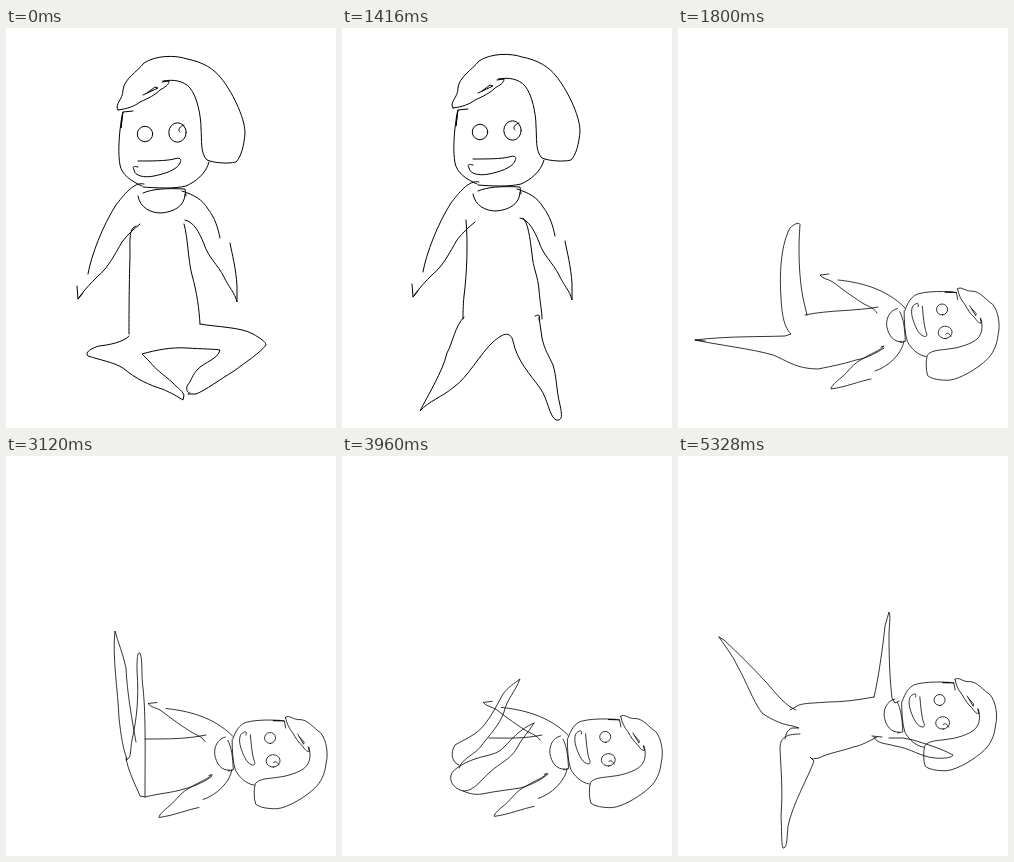
These frames come from a looping animation (330 px wide and 400 px high, 5760 ms). An HTML page without scripts:

```html
<!DOCTYPE html>
<html lang="en">
<head>
<meta charset="utf-8">
<title>Stretching doodle</title>
<style>
html, body { margin: 0; width: 100%; height: 100%; overflow: hidden; background: #fff; }
svg { display: block; width: 100%; height: 100%; overflow: hidden; }
path, circle, ellipse { vector-effect: non-scaling-stroke; }
.ink { fill: none; stroke: #000; stroke-width: 1; stroke-linecap: round; stroke-linejoin: round; }
.thin { stroke-width: .8; }
/* poses sit side by side; the strip jumps one stage width at a time */
.strip { animation: flip 5760ms step-end infinite; }
@keyframes flip {
  0% { transform: translateX(0); }
  14.5833% { transform: translateX(-330px); }
  31.25% { transform: translateX(-660px); }
  54.1667% { transform: translateX(-990px); }
  68.75% { transform: translateX(-1320px); }
  81.25%, 100% { transform: translateX(-1650px); }
}
</style>
</head>
<body>
<svg viewBox="0 0 330 400">
<defs>
  <g id="head">
    <path d="M112 82C108 76 117 72 117 62C118 51 131 44 138 35C150 27 170 27 181 31C197 34 208 41 215 50C225 62 239 89 239 105C238 118 235 129 230 134C222 136 208 135 201 132C194 125 196 112 195 100C195 88 191 68 184 60C178 53 168 51 157 53"/>
    <path d="M112 82C121 81 129 78 134 74C143 70 149 67 154 62C159 59 163 57 163 53L156 54M137 67L152 60L149 59L141 65"/>
    <path d="M127 83L117 84C115 90 115 96 114 102C113 112 112 126 114 137C116 147 125 153 136 158M117 84L115 100L116 90"/>
    <path d="M203 134C200 146 189 154 180 158C168 161 150 160 137 159"/>
    <circle cx="139" cy="106" r="7.7"/>
    <ellipse cx="171.500" cy="104.500" rx="8.700" ry="9.700"/>
    <path d="M178 97C174 98 171 102 174 104"/>
    <path d="M132 133C145 133 160 133 168 131C174 129 176 131 174 135C171 142 158 146 148 148C138 150 129 148 128 142C126 138 128 138 132 139"/>
    <path d="M137 165C146 161 160 160 179 161L180 168M132 168C134 180 145 185 155 185C168 184 179 178 179 166"/>
  </g>

  <g id="upright">
    <use href="#head"/>
    <path d="M138 156C128 153 117 168 110 177C97 197 85 228 82 246M71 258L72 271L77 265M72 271C78 262 85 255 92 248C102 240 109 226 116 214C122 206 128 201 134 196"/>
    <path d="M176 163C188 167 196 171 202 181C209 190 212 200 214 210M224 215C226 226 230 240 231 258V274C229 265 222 258 218 249C212 237 202 229 198 216C193 204 188 194 179 192"/>
  </g>

  <g id="tilted">
    <use href="#head" transform="matrix(.062 .708 -.713 .064 331 176.300)"/>
  </g>

  <g id="lying">
    <use href="#tilted"/>
    <path d="M160 252C180 254 208 260 227 280M151 246L142 247C145 251 150 251 155 254C165 262 178 271 186 276C192 279 197 281 199 285"/>
    <path d="M226 313C224 326 210 339 197 343M193 351C182 353 168 359 153 361C153 358 158 354 164 349C171 343 174 336 186 330C194 325 203 322 206 318L203 319"/>
  </g>
</defs>

<g class="strip ink">
  <!-- cross-legged -->
  <g>
    <use href="#upright"/>
    <path d="M130 198L127 200C123 205 124 215 124 228C123 260 123 290 123 306M178 196C182 210 182 232 186 247C191 265 193 280 194 296"/>
    <path d="M123 308C118 314 103 317 93 318C83 321 79 325 82 328C94 332 107 334 117 340C130 351 143 357 156 361C166 365 172 369 177 372L178 367C175 361 171 360 167 355C157 346 149 341 144 334C140 330 138 328 136 326C150 322 165 319 181 320C195 321 210 321 214 322C212 331 199 334 192 341C186 347 186 352 181 358C180 363 182 365 184 365"/>
    <path d="M194 296C210 299 235 299 247 306C254 310 260 314 260 317C255 324 240 334 228 343C213 352 200 362 190 366H182"/>
  </g>

  <!-- standing -->
  <g transform="translate(330)">
    <use href="#upright" x="-1" y="-2"/>
    <path d="M124 192C126 215 125 245 122 268C121 278 121 286 121 291M181 190C186 194 188 210 190 226C191 240 196 248 197 262C198 275 200 283 200 291M193 288C198 286 198 287 197 292"/>
    <path d="M122 289C113 298 111 314 105 325C100 345 87 365 78 383C87 373 100 369 112 359C126 349 138 326 151 314C160 306 168 302 171 313C175 333 188 346 198 360C206 371 207 388 214 392C221 393 220 387 218 377C214 361 215 350 211 337C206 326 203 323 200 310L197 289"/>
  </g>

  <!-- one leg raised -->
  <g class="thin" transform="translate(660)">
    <use href="#lying"/>
    <path d="M127 287C150 282 180 283 200 279M27 313L17 312C50 308 80 309 107 308L113 306C107 300 104 290 103 270C101 240 104 215 112 200C117 195 122 194 122 197C120 220 121 250 125 270L129 287"/>
    <path d="M17 312C40 317 75 321 95 327C108 332 118 341 140 341C155 338 165 336 178 332C190 330 200 324 206 320"/>
  </g>

  <!-- both legs raised -->
  <g class="thin" transform="translate(990)">
    <use href="#lying" y=".5"/>
    <path d="M139 283C165 283 180 283 200 279M206 320C200 325 190 330 178 333C165 337 155 337 139 341L134 340C130 330 122 315 120 302"/>
    <path d="M130 286C126 264 121 236 120 212C117 198 112 186 109 175C106 200 112 235 113 262C115 280 117 293 121 303"/>
    <path d="M120 304C126 303 124 293 126 284C131 262 133 240 131 215C131 205 131 195 134 197C137 205 135 218 137 232C140 260 139 300 139 341"/>
  </g>

  <!-- knees tucked -->
  <g class="thin" transform="translate(1320)">
    <use href="#lying" x="-.8" y="-.6"/>
    <path d="M147 282C165 282 182 283 200 279M121 335C128 338 134 339 140 338C154 335 166 334 178 332C190 329 200 323 206 318"/>
    <path d="M117 309C110 307 108 297 113 289C121 284 135 279 143 268C150 259 155 249 161 238C166 231 173 227 178 223C173 236 165 243 162 256C157 270 148 278 140 289C133 299 120 302 117 312"/>
    <path d="M192 267C178 273 170 283 162 291C155 299 145 299 136 302C126 305 111 312 109 319C107 327 114 334 122 335C132 335 140 323 148 316C158 307 169 303 175 292C179 283 187 276 192 267"/>
  </g>

  <!-- limbs spread -->
  <g class="thin" transform="translate(1650)">
    <use href="#tilted" x="-2.500" y="-37.500"/>
    <path d="M196 241C200 225 205 190 207 170L211 156C213 160 211 170 211 180C211 205 212 225 214 242L217 247L221 245"/>
    <path d="M196 241C180 244 165 246 150 246C138 247 127 247 121 249L112 254M41 181L46 184C60 197 75 212 88 226C100 240 108 250 118 254M41 181C47 190 55 200 60 211C68 225 75 245 84 257C95 265 107 269 115 270L121 272H114C109 274 108 278 107 283"/>
    <path d="M122 278C107 278 102 282 102 293C103 315 105 335 103 360C104 375 103 386 105 392C109 393 109 382 110 370C115 347 130 322 136 305L132 301L134 303L141 302C150 297 165 295 175 291C183 290 193 284 199 281"/>
    <path d="M196 281C199 288 207 287 217 290C232 292 243 301 257 302C268 303 275 301 275 299C262 292 248 288 235 284L225 282H211M194 280L204 281"/>
  </g>
</g>
</svg>
</body>
</html>
```
